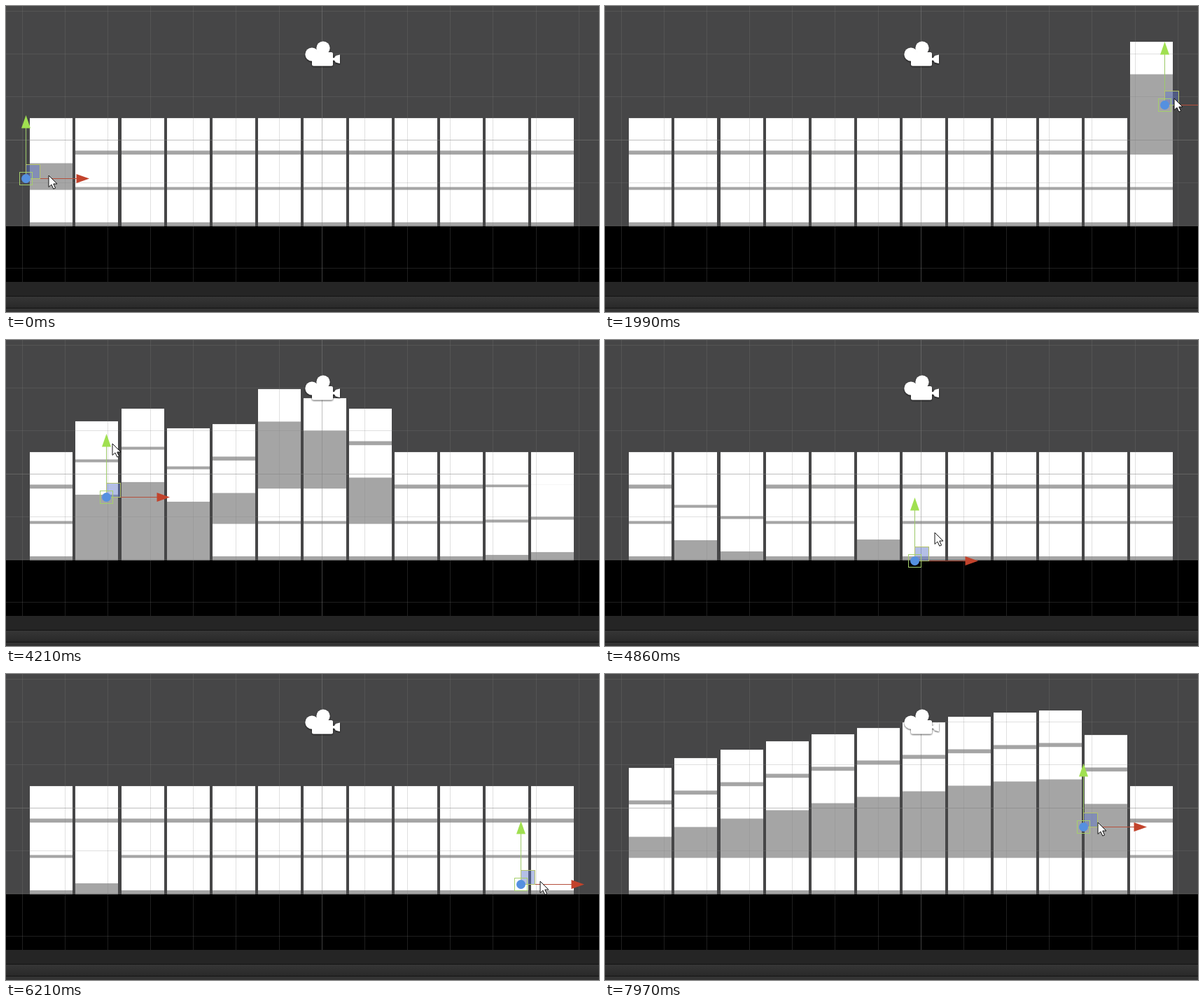
An HTML page for the animation above (8 s loop, 847 px wide and 437 px high).

```html
<!DOCTYPE html>
<html lang="en">
<head>
<meta charset="utf-8">
<title>Stacked boxes</title>
<style>
  html, body { margin: 0; width: 100%; height: 100%; overflow: hidden; background: #464647; }
  svg { display: block; width: 100%; height: 100%; }
</style>
</head>
<body>
<svg id="stage" viewBox="0 0 847 437">
  <defs>
    <linearGradient id="bar" x1="0" y1="0" x2="0" y2="1">
      <stop offset="0" stop-color="#363636"/>
      <stop offset="1" stop-color="#292929"/>
    </linearGradient>
    <filter id="shade" x="-20%" y="-20%" width="140%" height="150%">
      <feDropShadow dx="0" dy="1" stdDeviation="1.3" flood-color="#000" flood-opacity=".8"/>
    </filter>
  </defs>
  <rect width="847" height="437" fill="#464647"/>
  <rect y="314.5" width="847" height="80" fill="#000"/>
  <g id="columns"></g>
  <g id="grid" stroke="#808080"></g>
  <rect y="394" width="847" height="43" fill="#252525"/>
  <rect y="414" width="847" height="1" fill="#131313"/>
  <rect y="415" width="847" height="16" fill="url(#bar)"/>
  <rect y="431" width="847" height="1" fill="#151515"/>
  <rect y="432" width="847" height="5" fill="#343434"/>
  <g fill="#fff" filter="url(#shade)">
    <circle cx="437" cy="69" r="9.6"/>
    <circle cx="453" cy="60" r="9.6"/>
    <rect x="437" y="66" width="30" height="19.5" rx="2.5"/>
    <path d="M466 74h3l2-3 6-1.5v12.5l-6-1.5-2-3h-3z"/>
  </g>
  <g id="gizmo">
    <path d="M0 0H73" stroke="#b5503c"/>
    <path d="M0 0V-73" stroke="#9cc968"/>
    <path d="M72-6.500 90.500 0 72 6.500z" fill="#c2432c"/>
    <path d="M-6.500-72 0-90.500 6.500-72z" fill="#a0e050"/>
    <rect y="-20" width="20" height="20" fill="#5a72c8" fill-opacity=".45" stroke="#b5c46a"/>
    <rect x="-9" y="-9" width="18" height="18" fill="none" stroke="#a5cf6c"/>
    <circle r="6.5" fill="#5590e0"/>
  </g>
  <path id="cursor" d="M0 0V16.5L3.9 13 6.8 19.2 9.6 18 6.8 12H12z" fill="#fff" stroke="#111" stroke-linejoin="round"/>
</svg>
<script>
const LOOP = 8000, COLS = 12, COL_W = 61, BOX_H = 46.3, FLOOR = 314.5;
const REST = [160.2, 212.2, 262.6];
const colX = c => Math.round(34.4 + 65.08 * c);
const $ = id => document.getElementById(id);

function add(parent, tag, attrs) {
  const el = document.createElementNS("http://www.w3.org/2000/svg", tag);
  for (const k in attrs) el.setAttribute(k, attrs[k]);
  return parent.appendChild(el);
}

// Turning points of the dragged gizmo: time, x, y
const PATH = [
  [-60, -43, 246], [0, 27, 246], [820, 712, 246], [1150, 868, 230], [1500, 868, 78],
  [1740, 870, 190], [1850, 849, 175], [1990, 799, 141], [2300, 800, 75], [2900, 810, 68],
  [3340, 872, 256], [3400, 850, 256], [3520, 712, 268], [3600, 621, 295], [3680, 590, 216],
  [3774, 525, 185], [3885, 460, 178], [3960, 395, 214], [4010, 330, 254], [4120, 200, 252],
  [4210, 143, 225], [4300, 160, 115], [4520, 400, 100], [4700, 498, 280], [4833, 460, 306],
  [4915, 395, 328], [4990, 330, 262], [5110, 265, 214], [5330, 196, 216], [5380, 208, 300],
  [5520, 156, 295], [5640, 185, 330], [6110, 712, 330], [6210, 735, 300], [6287, 720, 258],
  [6355, 655, 258], [6420, 590, 212], [6617, 395, 168], [6700, 330, 136], [6950, 174, 103],
  [7100, 20, 100], [7190, -30, 218], [7250, -5, 218], [7900, 645, 218], [7970, 683, 218], [8020, 705, 218]
];
// Pointer offset from the gizmo: time, dx, dy
const GRIP = [
  [0, 33, -4], [1990, 14, -9], [3600, -13, -13], [4210, 9, -76],
  [5520, 41, -3], [6950, 13, -5], [7970, 21, -6]
];

// Smooth curve through the keys, level at each turn.
function follow(keys, t, k) {
  let i = 0;
  while (i < keys.length - 2 && t >= keys[i + 1][0]) i++;
  const slope = j => {
    const p = keys[Math.max(0, j - 1)], q = keys[j], n = keys[Math.min(keys.length - 1, j + 1)];
    const turns = p !== q && q !== n && (q[k] - p[k]) * (n[k] - q[k]) <= 0;
    return turns ? 0 : (n[k] - p[k]) / (n[0] - p[0]);
  };
  const a = keys[i], b = keys[i + 1], d = b[0] - a[0];
  const u = Math.min(1, (t - a[0]) / d), diff = b[k] - a[k];
  const va = slope(i) * d, vb = slope(i + 1) * d;
  return a[k] + u * (va + u * (3 * diff - 2 * va - vb + u * (va + vb - 2 * diff)));
}

// The pusher strikes boxes near its height as it enters a column.
// Struck boxes shoot up, then drop; a downward stroke is weaker.
const REACH_X = 70, REACH_Y = 38, RISE = 150, SLACK = 44;
const rise = age => age < RISE ? Math.sin(Math.PI / 2 * age / RISE) : 1;
const drop = age => 125 * Math.pow(age / 880, 1.7);
const hits = [];

function findHits() {
  const inside = Array(COLS).fill(true);
  for (let t = PATH[0][0]; t < LOOP; t += 4) {
    const x = follow(PATH, t, 1), y = follow(PATH, t, 2);
    const fall = Math.max(0, (y - follow(PATH, t - 8, 2)) / 8);
    const peak = Math.max(55, 115 - 180 * fall);
    for (let col = 0; col < COLS; col++) {
      const near = Math.abs(x - colX(col) - COL_W / 2) < REACH_X;
      if (near && !inside[col]) REST.forEach((top, box) => {
        if (Math.abs(y - top - BOX_H / 2) < REACH_Y) hits.push({ col, box, t, peak });
      });
      inside[col] = near;
    }
  }
}

function liftsAt(t) {
  const lifts = Array.from({ length: COLS }, () => [0, 0, 0]);
  for (const h of hits) {
    const age = t - h.t, col = lifts[h.col];
    if (age > 0) col[h.box] = Math.max(col[h.box], h.peak * rise(age) - drop(age));
  }
  // A box that rises far enough pushes the one above.
  for (const col of lifts)
    for (const b of [1, 0]) col[b] = Math.max(col[b], col[b + 1] - SLACK);
  return lifts;
}

const columns = Array.from({ length: COLS }, (_, c) => {
  const place = { x: colX(c), width: COL_W };
  return {
    back: add($("columns"), "rect", { ...place, fill: "#a5a5a5" }),
    boxes: REST.map(() => add($("columns"), "rect", { ...place, height: BOX_H, fill: "#fff" }))
  };
});

for (let i = 0; i < 14; i++) {
  const x = Math.floor(23 + 61.18 * i) + .5;
  add($("grid"), "path", { d: `M${x} 0V394`, opacity: i === 7 ? .5 : .24 });
}
for (let i = 0; i < 7; i++) {
  const y = Math.floor(7.4 + 61.2 * i) + .5;
  add($("grid"), "path", { d: `M0 ${y}H847`, opacity: i === 3 ? .5 : .24 });
}

function draw(t) {
  const lifts = liftsAt(t);
  columns.forEach(({ back, boxes }, c) => {
    const ys = REST.map((y, b) => y - Math.round(lifts[c][b]));
    const top = Math.min(...ys);
    back.setAttribute("y", top);
    back.setAttribute("height", FLOOR - top);
    boxes.forEach((box, b) => box.setAttribute("y", ys[b]));
  });
  const x = Math.round(follow(PATH, t, 1)), y = Math.round(follow(PATH, t, 2));
  const cx = x + Math.round(follow(GRIP, t, 1)), cy = y + Math.round(follow(GRIP, t, 2));
  $("gizmo").setAttribute("transform", `translate(${x + .5} ${y + .5})`);
  $("cursor").setAttribute("transform", `translate(${cx} ${cy})`);
}

findHits();
const begin = performance.now();
function tick() {
  draw((performance.now() - begin) % LOOP);
  requestAnimationFrame(tick);
}
tick();
</script>
</body>
</html>
```
